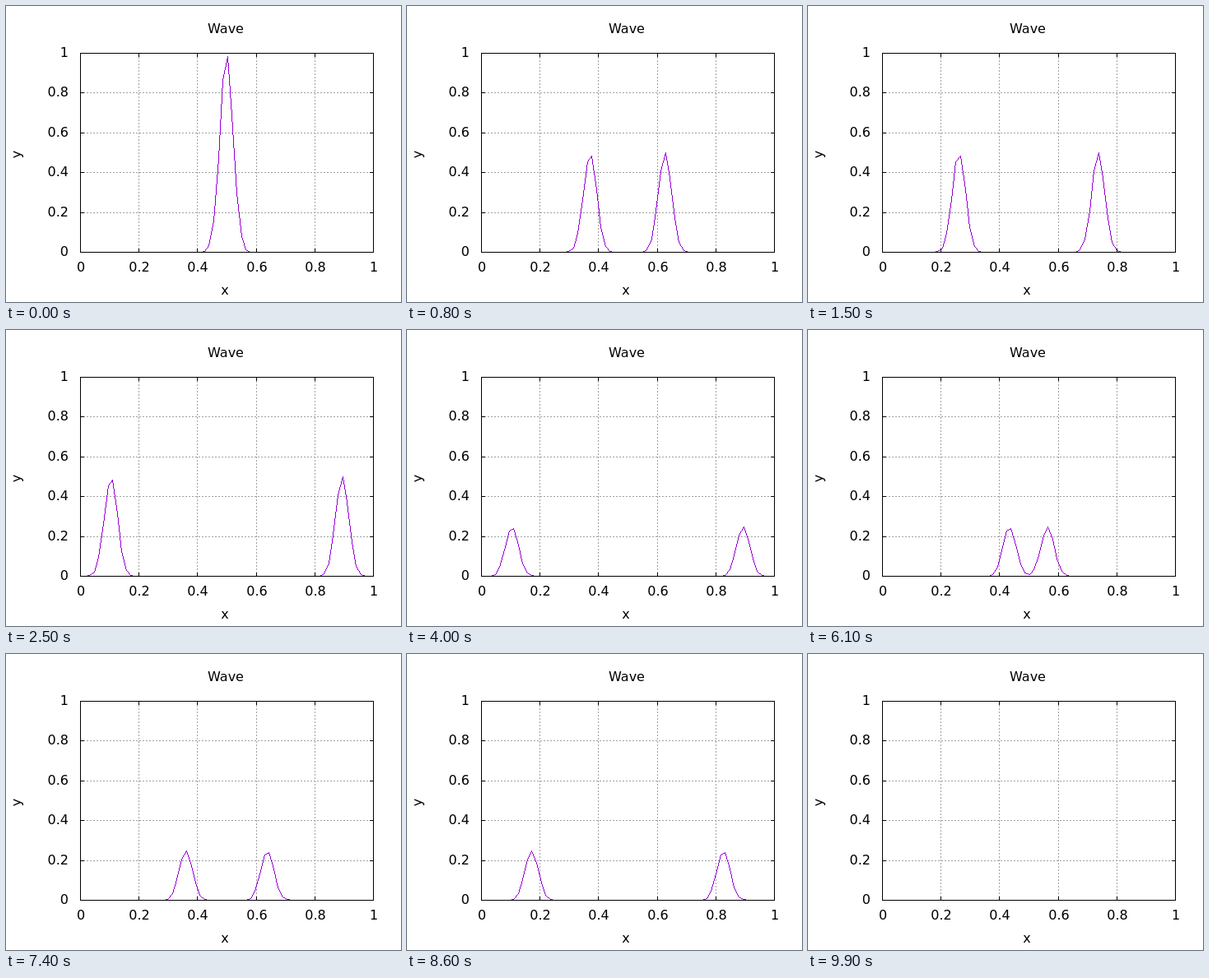
Animation of 480 by 360 pixels, one loop 10000 ms. Source, as an HTML page with a canvas:

```html
<!DOCTYPE html>
<html>
<head>
<meta charset="utf-8">
<style>
html, body { margin: 0; width: 100%; height: 100%; overflow: hidden; background: #fff; }
canvas { display: block; }
</style>
</head>
<body>
<canvas id="stage" width="480" height="360"></canvas>
<script>
const ctx = document.getElementById('stage').getContext('2d');
const LEFT = 90, RIGHT = 446, TOP = 57, BOTTOM = 299;
const POINTS = 64, DX = 0.0157, LAST = 99;

const px = x => Math.round(LEFT + x * (RIGHT - LEFT));
const py = y => BOTTOM - Math.round(y * (BOTTOM - TOP));
const bell = d => Math.exp(-0.2441 * d * d);

// Two pulses part, turn back at the walls and lose half their height there.
function wave(i, step) {
  const bounces = Math.floor((step + 32) / 65);
  const shift = step - 65 * bounces;
  const travel = bounces % 2 ? -shift : shift;
  // pulses swap sides when they cross, so travel may be negative
  const height = 0.5 / 2 ** bounces;
  return height * (bell(i - 31.62 + travel) + bell(i - 31.9 - travel));
}

// Hard-edged line, one pixel wide
function pixelLine(x0, y0, x1, y1) {
  const n = Math.max(Math.abs(x1 - x0), Math.abs(y1 - y0), 1);
  for (let k = 0; k <= n; k++) {
    ctx.fillRect(Math.round(x0 + (x1 - x0) * k / n), Math.round(y0 + (y1 - y0) * k / n), 1, 1);
  }
}

function drawGrid() {
  ctx.fillStyle = '#a0a0a0';
  for (let k = 1; k < 5; k++) {
    const x = px(k / 5), y = py(k / 5);
    for (let gx = LEFT; gx < RIGHT; gx += 4) ctx.fillRect(gx, y, 2, 1);
    for (let gy = BOTTOM - 1; gy > TOP; gy -= 4) ctx.fillRect(x, gy, 1, 2);
  }
}

function drawCurve(step) {
  ctx.fillStyle = '#9400d3';
  const point = i => [px(i * DX), py(wave(i, step))];
  for (let i = 1; i < POINTS; i++) pixelLine(...point(i - 1), ...point(i));
}

function drawAxes() {
  ctx.fillStyle = ctx.strokeStyle = '#000';
  ctx.lineWidth = 1;
  ctx.strokeRect(LEFT + 0.5, TOP + 0.5, RIGHT - LEFT, BOTTOM - TOP);
  ctx.font = '16px "DejaVu Sans", sans-serif';
  for (let k = 0; k <= 5; k++) {
    const x = px(k / 5), y = py(k / 5), label = String(k / 5);
    ctx.fillRect(x, TOP, 1, 5);
    ctx.fillRect(x, BOTTOM - 4, 1, 5);
    ctx.fillRect(LEFT, y, 5, 1);
    ctx.fillRect(RIGHT - 4, y, 5, 1);
    ctx.textAlign = 'center';
    ctx.fillText(label, x + 1, 323);
    ctx.textAlign = 'right';
    ctx.fillText(label, 76, y + 5);
  }
  ctx.textAlign = 'center';
  ctx.fillText('Wave', 267, 33);
  ctx.fillText('x', 266, 351);
  ctx.save();
  ctx.translate(18, 180.5);
  ctx.rotate(-Math.PI / 2);
  ctx.fillText('y', 0, 0);
  ctx.restore();
}

function draw() {
  const step = Math.floor(performance.now() % 10000 / 100);
  ctx.fillStyle = '#fff';
  ctx.fillRect(0, 0, 480, 360);
  drawGrid();
  if (step < LAST) drawCurve(step);
  drawAxes();
  requestAnimationFrame(draw);
}
draw();
</script>
</body>
</html>
```
